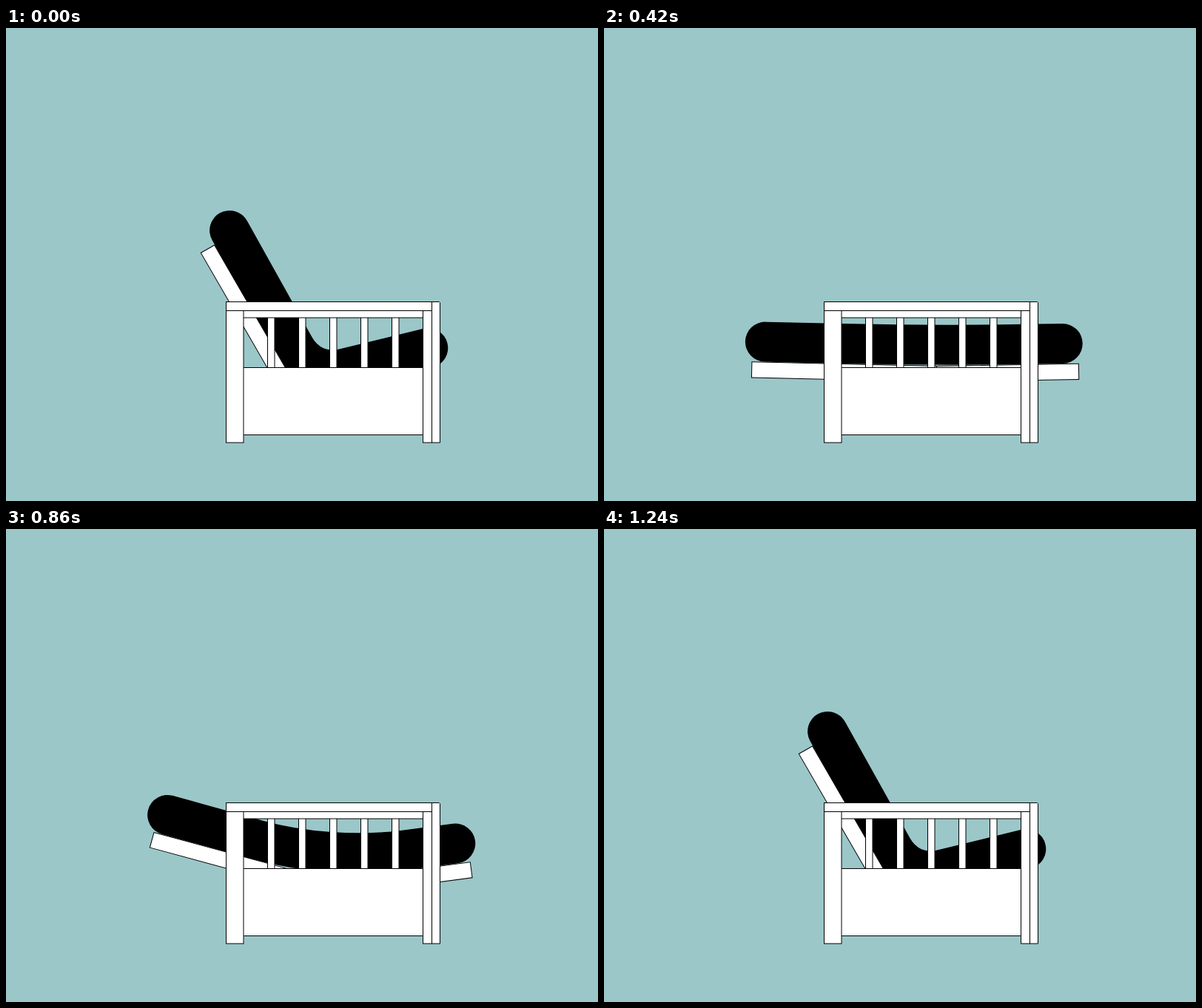
An HTML page that plays this animation: 800 px wide and 640 px high, repeating every 1360 ms.

```html
<!DOCTYPE html>
<html lang="en">
<head>
<meta charset="utf-8">
<title>Sofa bed</title>
<style>
  html, body { margin: 0; width: 100%; height: 100%; overflow: hidden; background: #9bc7c9; }
  svg { display: block; width: 800px; height: 640px; }
  .wood { fill: #fff; stroke: #000; stroke-width: 1; }
  #pad { fill: none; stroke: #000; stroke-width: 54; stroke-linecap: round; }
</style>
</head>
<body>
<svg viewBox="0 0 800 640">
  <path id="pad"/>
  <rect id="back" class="wood" x="-250" y="-10.6" width="250" height="21.2"/>
  <rect id="seat" class="wood" y="-10.6" width="192" height="21.2"/>
  <g id="slats" class="wood"></g>
  <g class="wood">
    <rect x="320.5" y="459.5" width="243" height="91"/>
    <rect x="320.5" y="382.5" width="243" height="9.5"/>
    <rect x="297.5" y="382.5" width="23.5" height="178.5"/>
    <rect x="563.5" y="382.5" width="12" height="178.5"/>
    <rect x="297.5" y="370.5" width="278" height="12"/>
    <path d="M575.5 370.5H585.5L586.5 371.5V561H575.5Z"/>
  </g>
</svg>
<script>
const LOOP = 1360, STEP = 20, LIFT = 38.2, RAD = Math.PI / 180;
const $ = id => document.getElementById(id);

// hinge x and y, back angle, seat angle, slip of the pad along the seat
const sofa = [397.5, 515.5, 60, 14, 0];
const raised = [444.3, 476.2, 18.7, 14, -9];
const hover = [450, 467.5, 0, 0, 0];
const flat = [450, 470.3, 0, 0, 0];

// while folding up, the seat tilts and the hinge sinks early
const foldPower = [1.1, 0.75, 1, 0.45, 1];
const fold = (p, i) => (p + 0.014 * Math.sin(2 * Math.PI * p)) ** foldPower[i];
const linear = p => p;

const moves = [
  { from: sofa, to: raised, start: 0, end: 260, ease: linear },
  { from: raised, to: hover, start: 260, end: 432, ease: linear },
  { from: hover, to: flat, start: 432, end: 460, ease: linear },
  { from: flat, to: sofa, start: 740, end: 1240, ease: fold }
];

for (let i = 0; i < 5; i++) {
  const r = document.createElementNS($('slats').namespaceURI, 'rect');
  const box = { x: 353.5 + i * 42, y: 391.5, width: 9.5, height: 68 };
  for (const k in box) r.setAttribute(k, box[k]);
  $('slats').append(r);
}

function pose(t) {
  const { from, to, start, end, ease } = moves.findLast(m => m.start <= t);
  const p = Math.min(1, (t - start) / (end - start));
  return from.map((v, i) => v + (to[i] - v) * ease(p, i));
}

// point at distance d from p towards q
function toward(p, q, d) {
  const f = d / Math.hypot(q[0] - p[0], q[1] - p[1]);
  return [p[0] + (q[0] - p[0]) * f, p[1] + (q[1] - p[1]) * f];
}

// pad end lying on a board; side is -1 for the back, 1 for the seat
function padEnd(x, y, deg, reach, side) {
  const s = Math.sin(deg * RAD), c = Math.cos(deg * RAD);
  return [x + side * (reach * c - LIFT * s), y - reach * s - LIFT * c];
}

function draw(t) {
  const [x, y, back, seat, slip] = pose(t);
  const turn = back + seat, half = turn / 2 * RAD, lean = (back - seat) / 2 * RAD;

  // the sharper the fold, the further the ends ride up and the tighter the bend
  const p = padEnd(x, y, back, 232 + 33 * Math.tan(half), -1);
  const q = padEnd(x, y, seat, 171 + 22 * Math.tan(half) + slip, 1);
  const high = LIFT / Math.cos(half);
  const c = [x + high * Math.sin(lean) - 4, y - high * Math.cos(lean)];
  const bend = 125 - 1.07 * turn, near = bend * 0.38;

  $('pad').setAttribute('d',
    `M${p}L${toward(c, p, bend)}C${toward(c, p, near)} ${toward(c, q, near)} ${toward(c, q, bend)}L${q}`);
  $('back').setAttribute('transform', `translate(${x} ${y}) rotate(${back})`);
  $('seat').setAttribute('transform', `translate(${x} ${y}) rotate(${-seat})`);
}

function tick() {
  const t = performance.now() % LOOP;
  draw(Math.floor(t / STEP) * STEP);
  requestAnimationFrame(tick);
}
tick();
</script>
</body>
</html>
```
